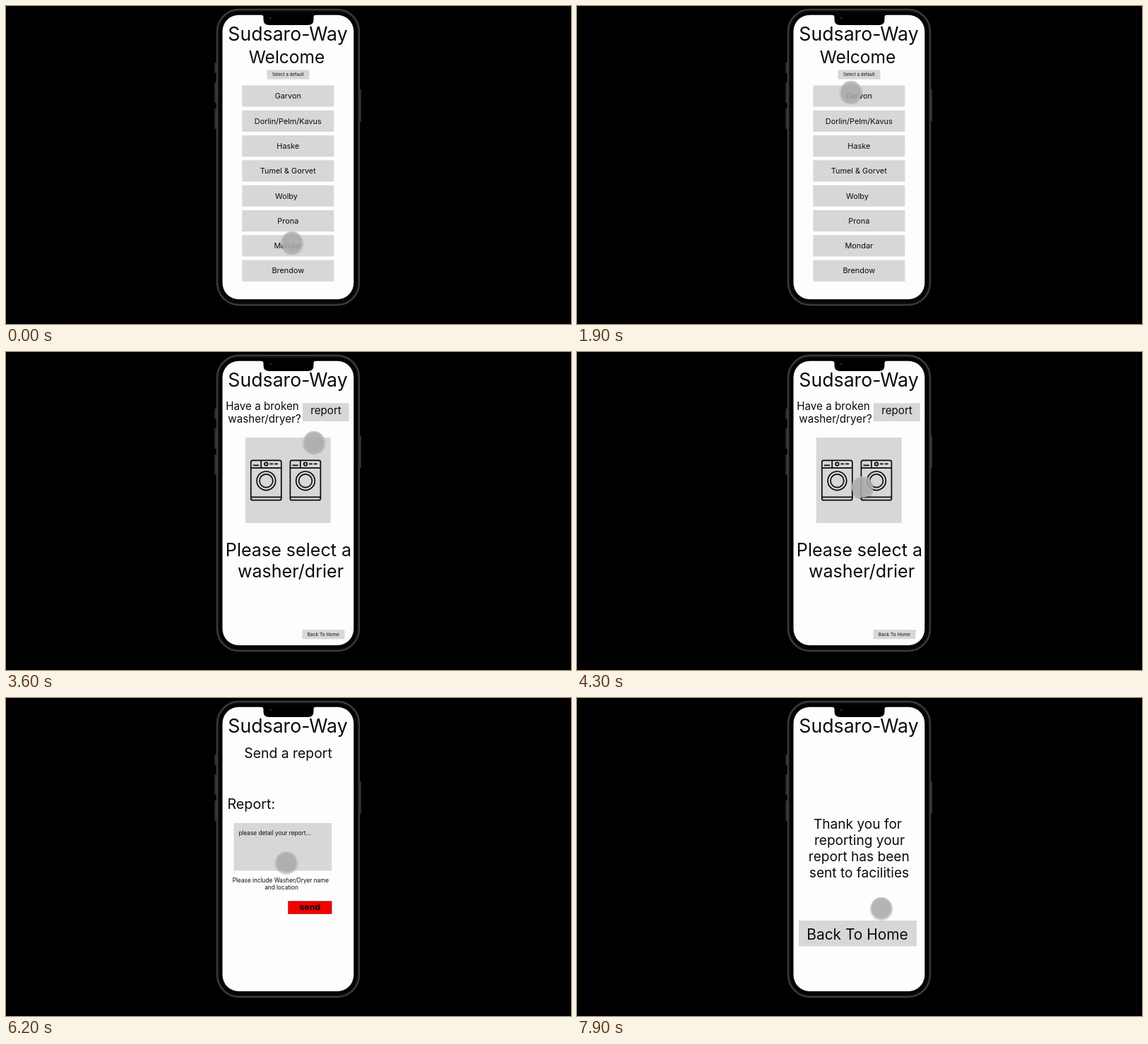
These frames come from a looping animation (800 px wide and 450 px high, 8 s). An HTML page:

```html
<!DOCTYPE html>
<html lang="en">
<head>
<meta charset="utf-8">
<title>Laundry app prototype</title>
<style>
  html, body { margin: 0; width: 100%; height: 100%; overflow: hidden; background: #000; }
  svg { display: block; width: 800px; height: 450px; }
  text { font-family: Inter, "Open Sans", sans-serif; font-optical-sizing: none; fill: #0b0b0b; white-space: pre; }
</style>
</head>
<body>
<svg viewBox="0 0 800 450" xmlns="http://www.w3.org/2000/svg">
  <defs>
    <filter id="soft" x="-50%" y="-50%" width="200%" height="200%">
      <feGaussianBlur stdDeviation="1.8"/>
    </filter>
    <g id="washer" fill="none" stroke="#0b0b0b" stroke-width="1.7" stroke-linecap="round">
      <rect x="346.8" y="153.3" width="43" height="56.4" rx="2.5"/>
      <path d="M347 164.2H389.6M347 205.4H389.6M361.2 153.5V164M350.5 160.3H357.5M374 158.3H377.5M380.8 158.3H384.3"/>
      <circle cx="368.4" cy="158.6" r="2.3"/>
      <circle cx="368.4" cy="182.3" r="13.3"/>
      <circle cx="368.4" cy="182.3" r="9.4"/>
    </g>
  </defs>

  <rect width="800" height="450"/>
  <g fill="#2e2e2e">
    <rect x="295.2" y="80" width="4" height="15" rx="1"/>
    <rect x="295.2" y="108" width="4" height="29" rx="1"/>
    <rect x="295.2" y="145" width="4" height="29" rx="1"/>
    <rect x="499" y="118" width="4" height="46" rx="1"/>
  </g>
  <rect x="299" y="5" width="201" height="418" rx="31" fill="#030303" stroke="#3b3b3b" stroke-width="2.4"/>
  <rect x="301.2" y="7.2" width="196.6" height="413.6" rx="29" fill="none" stroke="#161616"/>
  <rect x="306.5" y="12.8" width="185.8" height="402.2" rx="23" fill="#fdfdfd"/>
  <path d="M361 12h77.5v.8q-3 0-3 3.2v3q0 8-8 8h-55q-8 0-8-8v-3q0-3.2-3.5-3.2z"/>
  <circle cx="374.5" cy="17" r="2.2" fill="#0b1020"/>
  <circle cx="374.5" cy="17" r="1" fill="#1b2a55"/>

  <g id="pages"></g>

  <g id="cursor">
    <circle id="shadow" cy="2" r="15" opacity=".3" filter="url(#soft)"/>
    <circle r="15" fill="#b4b4b4" fill-opacity=".82" stroke="#e0e0e0" stroke-opacity=".5" stroke-width=".8"/>
  </g>
</svg>

<script>
const LOOP = 8000, STEP = 100, GREY = '#d7d7d7';

const box = (x, y, w, h, fill = GREY, extra = '') =>
  `<rect x="${x}" y="${y}" width="${w}" height="${h}" fill="${fill}" ${extra}/>`;
const label = (str, x, y, size, anchor = 'middle', extra = '') =>
  `<text x="${x}" y="${y}" font-size="${size}" text-anchor="${anchor}" ${extra}>${str}</text>`;

const halls = ['Garvon', 'Dorlin/Pelm/Kavus', 'Haske', 'Tumel &amp; Gorvet',
  'Wolby', 'Prona', 'Mondar', 'Brendow'];
const hallRow = (name, i) => {
  const y = 112.4 + i * 35.3;
  return box(334.3, y, 130, 30.2) + label(name, i === 4 ? 397 : 399.3, y + 18.9, 10.87);
};

const home =
  label('Welcome', 397.5, 81, 24.5) +
  box(369.5, 90.5, 60, 13.2) + label('Select a default', 399.3, 99.4, 6.1) +
  halls.map(hallRow).join('');

const machines =
  label('Have a broken', 363, 82, 15.2) + label('washer/dryer?', 366, 100.4, 15.2) +
  box(420, 72.3, 65.6, 25.7) + label('report', 453, 88, 15.2) +
  box(338.8, 121, 121, 121) +
  '<use href="#washer"/><use href="#washer" x="55.6"/>' +
  label('Please select a', 400, 289, 25.1) + label('washer/drier', 403, 319.2, 25.1) +
  box(419.5, 393, 60, 13.2) + label('Back To Home', 449.3, 402, 6.55);

const report =
  label('Send a report', 399.5, 85, 19.4) +
  label('Report:', 313.4, 157.4, 19.8, 'start') +
  box(322.5, 177, 138.7, 67.4) +
  label('please detail your report...', 329.4, 194.2, 8.26, 'start') +
  label('Please include Washer/Dryer name', 389, 261.3, 8.24) +
  label('and location', 390, 271.3, 8.24) +
  box(399.8, 287.8, 61.2, 17.4, '#f20000', 'stroke="#a80000" stroke-width=".8"') +
  label('send', 430.3, 300.2, 12.2, 'middle', 'font-weight="800" style="fill:#240000"');

const thanks =
  ['Thank you for', 'reporting your', 'report has been', 'sent to facilities']
    .map((line, i) => label(line, [397.5, 400, 399.3, 399.5][i], 184.8 + i * 23.15, 19.1)).join('') +
  box(314, 315, 167, 36.3) + label('Back To Home', 397, 342, 20.9);

// [start time, content]
const pages = [[0, home], [3400, machines], [5600, report], [7800, thanks]];
const root = document.getElementById('pages');
root.innerHTML = label('Sudsaro-Way', 399, 49.4, 26.7) +
  pages.map(([, body]) => `<g class="page">${body}</g>`).join('');
const layers = [...root.querySelectorAll('.page')];

// Pointer path: [time, x, y]
const path = [
  [0, 405, 334], [400, 405, 334], [600, 398, 275], [800, 418, 153], [1000, 430, 123],
  [1200, 443, 135], [1500, 405, 219], [1700, 370, 165], [1900, 388, 121], [2000, 405, 112],
  [2200, 435, 118], [2400, 427, 120], [2600, 436, 127], [3900, 436, 127], [4300, 404, 191],
  [4800, 452, 75], [5100, 452, 78], [5900, 452, 78], [6200, 397, 232], [6500, 410, 298],
  [6800, 425, 304], [7000, 446, 306], [7300, 415, 300], [7700, 431, 297], [8000, 431, 297]
];

// Slope at a key; flat at turning points and rests.
function slope(i, axis) {
  const a = path[i - 1], b = path[i], c = path[i + 1];
  if (!a || !c || (b[axis] - a[axis]) * (c[axis] - b[axis]) <= 0) return 0;
  return (c[axis] - a[axis]) / (c[0] - a[0]);
}

function glide(t, axis) {
  const i = path.findIndex((k, n) => n === path.length - 2 || t < path[n + 1][0]);
  const a = path[i], b = path[i + 1], d = b[0] - a[0], u = (t - a[0]) / d;
  const s = u * u * (3 - 2 * u);
  return a[axis] + (b[axis] - a[axis]) * s +
    d * u * (1 - u) * (slope(i, axis) * (1 - u) - slope(i + 1, axis) * u);
}

const cursor = document.getElementById('cursor');
const shadow = document.getElementById('shadow');
const start = performance.now();

function draw() {
  const now = Math.max(0, performance.now() - start) % LOOP;
  const t = Math.floor(now / STEP) * STEP;
  const shown = pages.filter(([from]) => from <= t).length - 1;
  layers.forEach((g, i) => { g.style.display = i === shown ? '' : 'none'; });
  cursor.setAttribute('transform', `translate(${glide(t, 1).toFixed(2)} ${glide(t, 2).toFixed(2)})`);
  shadow.setAttribute('opacity', t >= 2900 && t < 3400 ? 0.08 : 0.3);
  requestAnimationFrame(draw);
}
draw();
</script>
</body>
</html>
```
